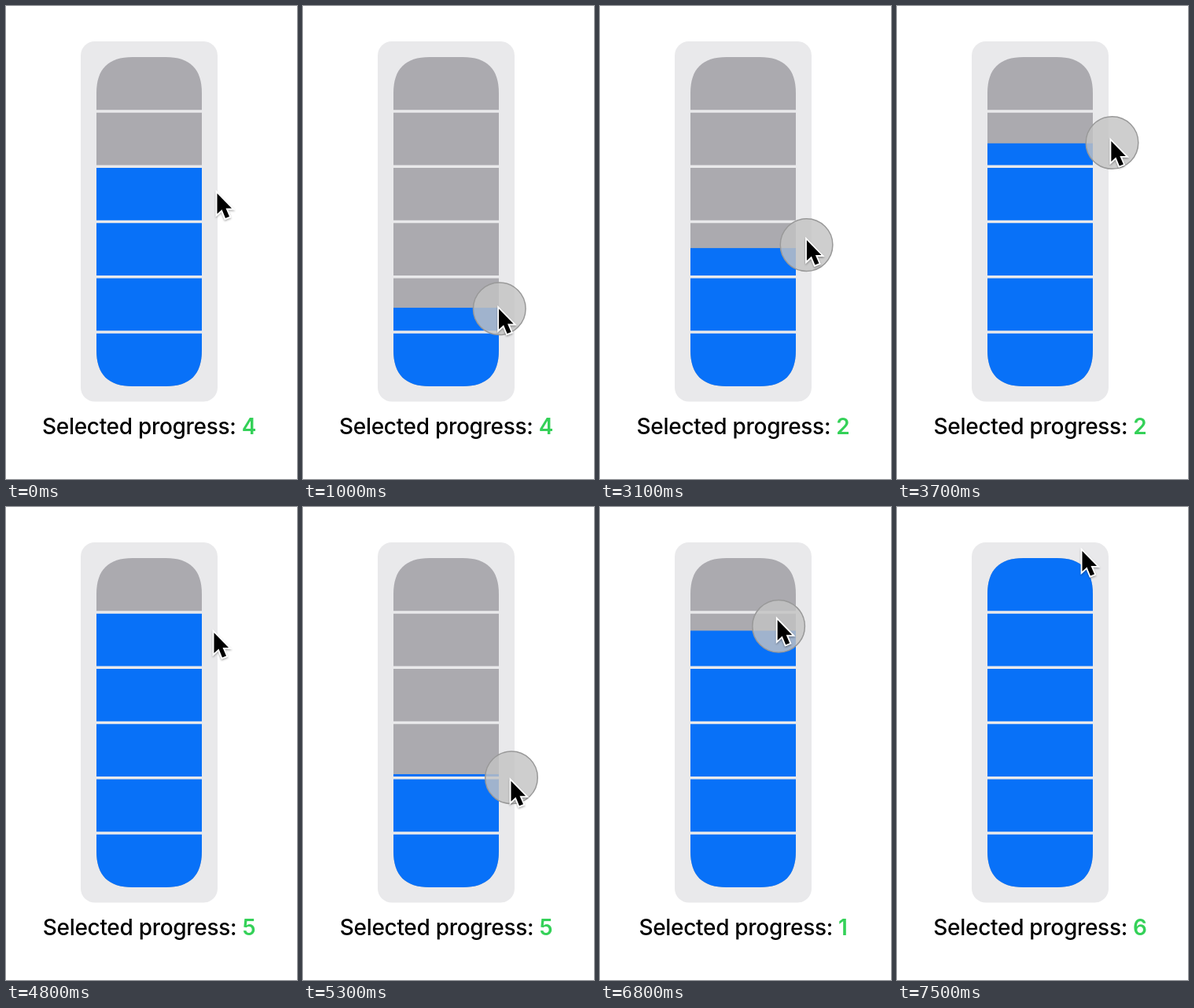
Recreate the animation shown at these times as an HTML page without scripts. Size 370 by 602 pixels, loop 7.6 s.

```html
<!DOCTYPE html>
<html lang="en">
<head>
<meta charset="utf-8">
<title>Segmented progress</title>
<style>
  @property --t { syntax: "<number>"; inherits: true; initial-value: 0; }

  html, body { margin: 0; width: 100%; height: 100%; overflow: hidden; background: #fff; }

  /* One clock, ten ticks per second; everything else is derived from it. */
  svg {
    display: block;
    width: 370px;
    height: 602px;
    animation: clock 7.6s steps(76) -10ms infinite;

    /* releases: 0 before, 1 after */
    --r1: clamp(0, var(--t) - 21, 1);
    --r2: clamp(0, var(--t) - 41, 1);
    --r3: clamp(0, var(--t) - 60, 1);
    --r4: clamp(0, var(--t) - 72, 1);
    --presses: clamp(0, var(--t) - 3, 1) + clamp(0, var(--t) - 27, 1)
             + clamp(0, var(--t) - 48, 1) + clamp(0, var(--t) - 62, 1);
    --held: calc(var(--presses) - var(--r1) - var(--r2) - var(--r3) - var(--r4));
    --level: calc(4 - 2 * var(--r1) + 3 * var(--r2) - 4 * var(--r3) + 5 * var(--r4));
  }
  @keyframes clock { from { --t: 0; } to { --t: 76; } }

  /* Pointer path: a sum of smoothstep moves, read at a slightly different time by each follower. */
  .follow {
    --now: calc(var(--t) - var(--lag));
    --a: clamp(0, (var(--now) - 4) / 6.8, 1);
    --b: clamp(0, (var(--now) - 28.4) / 5.9, 1);
    --c: clamp(0, (var(--now) - 35) / 4, 1);
    --d: clamp(0, (var(--now) - 48.5) / 7.5, 1);
    --e: clamp(0, (var(--now) - 63) / 7.6, 1);
    --f: clamp(0, (var(--now) - 71) / 4, 1);
    --drift: clamp(0, (var(--now) - 22) / 4, 1);
    --sa: calc(var(--a) * var(--a) * (3 - 2 * var(--a)));
    --sb: calc(var(--b) * var(--b) * (3 - 2 * var(--b)));
    --sc: calc(var(--c) * var(--c) * (3 - 2 * var(--c)));
    --sd: calc(var(--d) * var(--d) * (3 - 2 * var(--d)));
    --se: calc(var(--e) * var(--e) * (3 - 2 * var(--e)));
    --sf: calc(var(--f) * var(--f) * (3 - 2 * var(--f)));
    --x: calc(269 - 20 * var(--sa) + 33 * var(--sb) - 17 * var(--sc) - 52 * var(--se) + 23 * var(--sf));
    --y: calc(239.5 + 151.5 * var(--sa) - 5 * var(--drift) - 199 * var(--sb) - 26 * var(--sc)
            + 283 * var(--sd) - 401 * var(--se) + 14 * var(--sf));
    transform: translate(calc(var(--x) * 1px), calc(var(--y) * 1px));
  }
  .arrow { --lag: -.1; }
  .touch { --lag: 0; opacity: var(--held); }
  .fill {
    --lag: .08;
    --rest: calc(484 - 70.2 * var(--level));
    transform: translateY(calc((var(--held) * var(--y) + (1 - var(--held)) * var(--rest)) * 1px));
  }

  text {
    font: 500 28px Inter, Roboto, sans-serif;
    letter-spacing: -.3px;
    text-anchor: middle;
  }
  tspan { font-weight: 600; fill: #34d158; }
  .n4 { opacity: calc(1 - var(--r1)); }
  .n2 { opacity: calc(var(--r1) - var(--r2)); }
  .n5 { opacity: calc(var(--r2) - var(--r3)); }
  .n1 { opacity: calc(var(--r3) - var(--r4)); }
  .n6 { opacity: var(--r4); }
</style>
</head>
<body>
<svg viewBox="0 0 370 602">
  <defs>
    <clipPath id="bar">
      <path d="M115 111c0-31 15-46 46-46h42c31 0 46 15 46 46v327c0 31-15 46-46 46h-42c-31 0-46-15-46-46z"/>
    </clipPath>
    <filter id="shadow" x="-50%" y="-50%" width="200%" height="200%">
      <feDropShadow dx="0" dy="1.5" stdDeviation="1.3" flood-opacity=".35"/>
    </filter>
  </defs>

  <rect x="95" y="45" width="174" height="458.5" rx="18" fill="#e9e9eb"/>
  <g clip-path="url(#bar)">
    <rect x="115" y="65" width="134" height="419" fill="#abaaaf"/>
    <rect class="follow fill" x="115" width="134" height="430" fill="#0871f8"/>
    <path d="M115 134h134M115 204.3h134M115 274.5h134M115 344.8h134M115 415h134" stroke="#e9e9eb" stroke-width="3.4"/>
  </g>

  <text class="n4" x="182" y="545">Selected progress: <tspan>4</tspan></text>
  <text class="n2" x="182" y="545">Selected progress: <tspan>2</tspan></text>
  <text class="n5" x="182" y="545">Selected progress: <tspan>5</tspan></text>
  <text class="n1" x="182" y="545">Selected progress: <tspan>1</tspan></text>
  <text class="n6" x="182" y="545">Selected progress: <tspan>6</tspan></text>

  <circle class="follow touch" r="33.3" fill="#c3c3c3" fill-opacity=".81" stroke="#999" stroke-width="1.5"/>
  <g class="follow arrow">
    <path transform="translate(-.5 -1)" d="M0 0V26L6 20.5 10.5 31.5 15.5 29.5 11 19H18.5Z"
      stroke="#fff" stroke-width="3.6" paint-order="stroke" filter="url(#shadow)"/>
  </g>
</svg>
</body>
</html>
```
